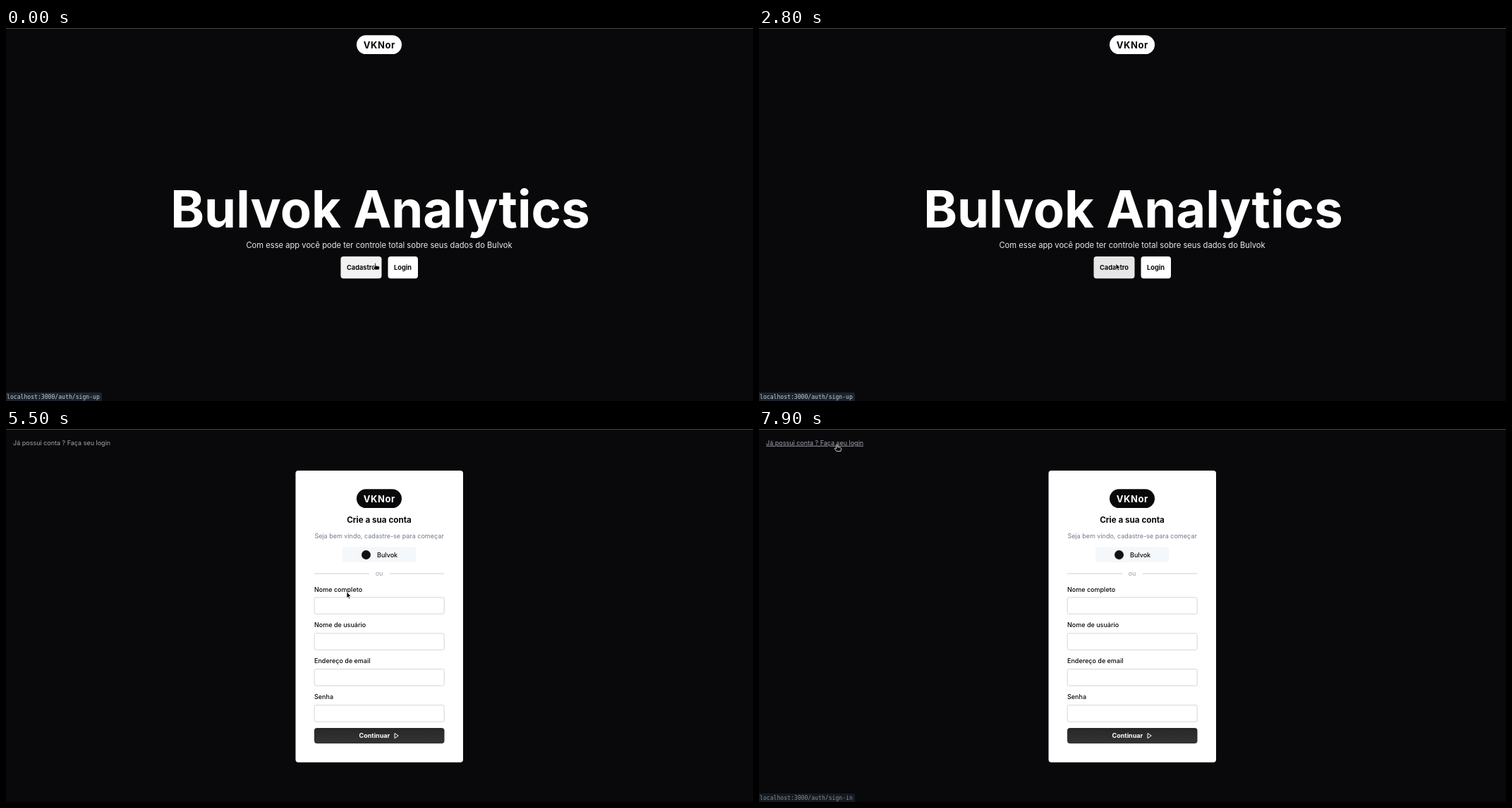
These frames come from a looping animation (1059 px wide and 529 px high, 8000 ms). An HTML page:

```html
<!DOCTYPE html>
<html lang="pt-BR">
<head>
<meta charset="utf-8">
<title>Bulvok Analytics</title>
<style>
  html, body { margin: 0; width: 100%; height: 100%; overflow: hidden; background: #09090b; }
  svg { display: block; width: 1059px; height: 529px; font: 9px Inter, sans-serif; }
  .mid { text-anchor: middle; }
  .bold { font-weight: 700; }
  .label { font-weight: 500; fill: #09090b; }
  .brand { font-size: 13px; font-weight: 700; letter-spacing: .6px; text-anchor: middle; }
  #statusText { font: 8.12px "DejaVu Sans Mono", monospace; fill: #c3ccd6; }
  #cursor { stroke: #fff; stroke-width: .8; stroke-linejoin: round; }
  #cursor.beam { fill: none; stroke: #111; }
</style>
</head>
<body>
<svg viewBox="0 0 1059 529">
  <defs>
    <linearGradient id="dark" x2="0" y2="1">
      <stop stop-color="#27272a"/><stop offset="1" stop-color="#333533"/>
    </linearGradient>
  </defs>
  <rect width="1059" height="529" fill="#09090b"/>
  <rect width="1059" height="1" fill="#48494a"/>

  <g id="home" fill="#fff">
    <rect x="497" y="10.3" width="64" height="26.8" rx="13.4"/>
    <text class="brand" x="529.3" y="28.5" fill="#09090b">VKNor</text>
    <text class="mid bold" x="530.5" y="283" font-size="72.4">Bulvok Analytics</text>
    <text class="mid" x="529" y="311.5" font-size="11.2" fill="#e9e9ea">Com esse app você pode ter controle total sobre seus dados do Bulvok</text>
    <rect id="signUp" x="474.5" y="324" width="58" height="31.2" rx="4"/>
    <rect x="541.5" y="324" width="42.5" height="31.2" rx="4"/>
    <g class="mid bold" font-size="9.2" fill="#09090b">
      <text x="503.5" y="343.3">Cadastro</text>
      <text x="562.5" y="343.3">Login</text>
    </g>
  </g>

  <g id="form">
    <text id="signIn" x="10" y="22.8" fill="#a1a5ae">Já possui conta ? Faça seu login</text>
    <rect x="410.5" y="59" width="237.5" height="413.7" rx="4" fill="#fff"/>
    <rect x="497" y="85.3" width="64" height="26.8" rx="13.4" fill="#09090b"/>
    <text class="brand" x="529.3" y="103.6" fill="#fff">VKNor</text>
    <text class="mid bold" x="529" y="132.8" font-size="11.7" fill="#09090b">Crie a sua conta</text>
    <text class="mid" x="529" y="155.4" fill="#71788a">Seja bem vindo, cadastre-se para começar</text>
    <rect id="provider" x="477" y="167.5" width="104" height="21.5" rx="2"/>
    <circle cx="510.5" cy="178.5" r="6.5" fill="#111"/>
    <text class="label" x="526" y="181.8">Bulvok</text>
    <path d="M437 205.2h78M544 205.2h77" stroke="#dedfe2" stroke-width="1.6"/>
    <text class="mid" x="529" y="208.4" fill="#9a9da5">ou</text>
    <g id="fields"></g>
    <path id="caret" d="M442.5 245v11" stroke="#111"/>
    <rect x="437" y="424" width="184.5" height="22" rx="4" fill="url(#dark)"/>
    <text class="bold" x="500.6" y="438.4" fill="#fff">Continuar</text>
    <path d="M551 431.6l5.2 3.4-5.2 3.6z" fill="none" stroke="#fff" stroke-linejoin="round"/>
  </g>

  <g id="status">
    <path id="statusBox" fill="#1c232c"/>
    <text id="statusText" x="1" y="526.3"></text>
  </g>
  <path id="cursor"/>
</svg>
<script>
const $ = id => document.getElementById(id);
const LOOP = 8000, STEP = 100, CLICK = 2800, FORM = 2900, FOCUS = 3800;
const FIELD_TOP = 238.9, FIELD_GAP = 50.9, FIELD_HEIGHT = 23.4;

$('fields').innerHTML = ['Nome completo', 'Nome de usuário', 'Endereço de email', 'Senha'].map((name, i) => {
  const y = FIELD_TOP + i * FIELD_GAP;
  return `<text class="label" x="437" y="${y - 8.4}">${name}</text>
    <rect x="437.2" y="${y}" width="184" height="${FIELD_HEIGHT}" rx="2" fill="#fff" stroke="#d6d6da"/>`;
}).join('');

const shapes = {
  arrow: 'M0 0v9l2.1-1.9 1.5 3.2 1.4-.7-1.5-3.1h2.8z',
  hand: 'M-.8 .7Q0-.4 .8.7V4l4.3.8q1.2.4 1 1.6L5.4 10H-.6L-3.2 6.6q-.3-1.2 1-.9L-.8 6.3z',
  beam: 'M-1.7-4.7h1.2l.5.4.5-.4h1.2M0-4.3v8.6M-1.7 4.7h1.2l.5-.4.5.4h1.2'
};

// Clickable areas; those with a path show it in the status bar.
const links = [
  { id: 'signUp', x: 474, y: 324, w: 59, h: 31, path: 'sign-up' },
  { id: 'provider', x: 477, y: 167, w: 104, h: 22, path: 'sign-up#', form: true },
  { id: 'continue', x: 437, y: 424, w: 184, h: 22, form: true },
  { id: 'signIn', x: 10, y: 12, w: 139, h: 14, path: 'sign-in', form: true }
];

// Pointer moves: start, end, destination.
const moves = [
  [0, 200, 517, 334.5],
  [1300, 1700, 510, 400],
  [1900, 2100, 506, 334],
  [3400, 3600, 487, 255],
  [4500, 4600, 479, 235],
  [5400, 5500, 483, 231],
  [5500, 5700, 500, 191],
  [5800, 6200, 514, 176],
  [6300, 6600, 518, 184],
  [6600, 6800, 509.5, 430],
  [7000, 7800, 110.5, 21.5]
];

function pointer(t) {
  let x = 523.5, y = 333;
  for (const [start, end, toX, toY] of moves) {
    const p = Math.min(1, Math.max(0, (t - start) / (end - start)));
    const ease = p * p * (3 - 2 * p);
    x += (toX - x) * ease;
    y += (toY - y) * ease;
  }
  return { x, y };
}

function linkAt(t) {
  const { x, y } = pointer(t);
  return links.find(l => !!l.form === t >= FORM &&
    x >= l.x && x <= l.x + l.w && y >= l.y && y <= l.y + l.h);
}

function cursorShape(t, { x, y }) {
  if (t >= CLICK && t < FORM) return 'arrow';
  if (linkAt(t)) return 'hand';
  const row = (y - FIELD_TOP) / FIELD_GAP;
  const inField = row >= 0 && row < 4 && row % 1 < FIELD_HEIGHT / FIELD_GAP && x > 437 && x < 621;
  return t >= FORM && inField ? 'beam' : 'arrow';
}

function draw(now) {
  const t = Math.floor(now % LOOP / STEP) * STEP;
  $('home').style.display = t < FORM ? '' : 'none';
  $('form').style.display = t < FORM ? 'none' : '';

  // Hover effects fade over three steps: average the recent past.
  const recent = [0, 1, 2].map(k => linkAt(t - k * STEP));
  const share = test => recent.filter(l => l && test(l)).length / 3;

  const gray = 242 - 12 * Math.min(1, t / 200), hover = 14 * share(l => l.id === 'provider');
  $('signUp').setAttribute('fill', `rgb(${gray},${gray},${gray})`);
  $('provider').setAttribute('fill', `rgb(${244 - hover},${248 - hover},${251 - hover})`);
  $('signIn').style.textDecoration = recent[0]?.id === 'signIn' ? 'underline' : 'none';
  $('caret').style.opacity = +(t >= FOCUS && (t - FOCUS) % 2600 < 1200);

  const url = 'localhost:3000/auth/' + recent.find(l => l?.path)?.path;
  $('statusText').textContent = url;
  $('statusBox').setAttribute('d', `M0 517H${url.length * 4.89 + 2}q2 0 2 2v10H0z`);
  $('status').style.opacity = share(l => l.path);

  const at = pointer(t), shape = cursorShape(t, at), cursor = $('cursor');
  cursor.setAttribute('class', shape);
  cursor.setAttribute('d', shapes[shape]);
  cursor.setAttribute('transform', `translate(${at.x} ${at.y})`);
  requestAnimationFrame(draw);
}
requestAnimationFrame(draw);
</script>
</body>
</html>
```
